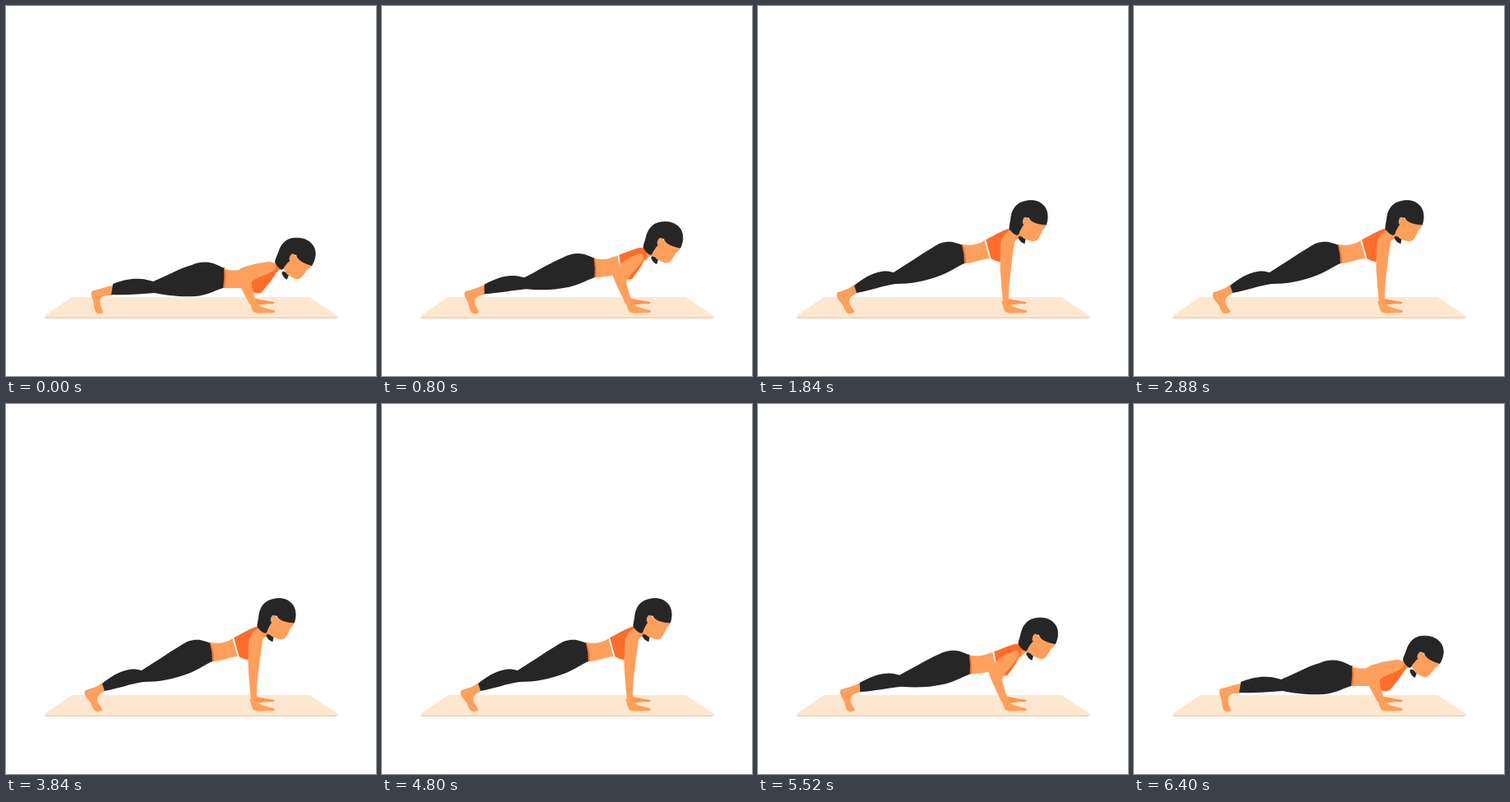
These frames come from a looping animation (450 by 450 pixels, 6.48 s). An HTML page:

```html
<!DOCTYPE html>
<html lang="en">
<head>
<meta charset="utf-8">
<title>Push-up</title>
<style>
  html, body { margin: 0; width: 100%; height: 100%; overflow: hidden; background: #fff; }
  svg { display: block; width: 100%; height: 100%; }
  .skin { fill: #ff9f5c; }
  .shade { fill: #fb9550; }
  .top { fill: #ff6d2b; }
  .dark { fill: #262626; }
  .line { fill: none; stroke-linecap: round; }
</style>
</head>
<body>
<svg viewBox="0 0 450 450">
  <path fill="#efd2ad" d="M48 377H402Q404 380 400 380H50Q46 380 48 377Z"/>
  <path fill="#fde8cf" d="M80 354H369L402 376Q404 378.5 400 378.5H50Q46 378.5 48 376Z"/>
  <path class="shade" d="M300 355C308 357 315 358 326 360C328 362 325 363 320 362C313 363 308 363 304 364Z"/>
  <path id="foot" class="skin"/>
  <path id="torso" class="skin"/>
  <path id="neck" class="shade"/>
  <path id="bra" class="top"/>
  <path id="hem" class="line" stroke="#fff" stroke-width="1.8"/>
  <path id="arm" class="skin"/>
  <path class="skin" d="M296 359L305 360C307 366 313 367 326 370C329 372 325 374 320 373C313 373 304 375 300 371Z"/>
  <path id="waist" class="line" stroke="#f0712f" stroke-width="2.4"/>
  <path id="pants" class="dark"/>
  <g id="head">
    <path class="dark" d="M-8 21C-5 21 -2 22 0 24L-1 30C-4 30 -8 26 -9 23Z"/>
    <path class="skin" d="M-3 -2L25 6C25 9 23 12 20 14C20 17 17 20 16 23C14 27 9 28 7 27L-2 24L-8 18Z"/>
    <path class="dark" stroke="#191919" stroke-width=".7" d="M25 7C27 1 28 -8 23 -15C17 -23 6 -24 -3 -21C-13 -18 -17 -10 -18 0C-19 8 -21 11 -18 14C-15 18 -11 20 -9 19C-7 13 -4 8 -1 5C0 0 2 -2 4 -2C6 3 12 6 25 7Z"/>
    <ellipse class="skin" cx="0" cy="2.5" rx="3" ry="4.8" transform="rotate(12)"/>
  </g>
</svg>
<script>
  const LOOP = 6480, STEP = 80;

  // Each part: evenly spaced poses from lowered to raised.
  const parts = {
    foot: [
      "M130 340C122 341 113 345 106 346C102 348 104 353 106 358C107 363 107 368 109 372C111 375 118 375 118 372C117 368 113 363 115 356C117 352 123 352 129 352Z",
      "M117 339C111 344 104 346 97 348C93 351 98 358 102 362C105 366 105 370 108 373C111 375 118 374 117 371C115 367 110 363 111 358C112 354 116 351 121 349Z"
    ],
    torso: [
      "M263 319C272 322 278 322 284 321L300 316L302 347L290 343C280 343 272 343 264 343Z",
      "M247 290C260 292 268 290 276 285L280 284L285 306L282 307C270 308 262 313 251 313Z"
    ],
    neck: [
      "M318 313L334 312L345 312L343 322C336 318 333 320 330 324L320 324Z",
      "M302 273L316 262L328 270L322 284C317 280 313 284 310 290L302 290Z"
    ],
    bra: [
      "M296 317C304 315 312 313 318 312C323 311 329 314 331 319C328 328 318 340 311 348C307 350 303 349 299 348Z",
      "M276 285C285 280 295 274 304 271C308 270 311 273 311 277C308 290 300 304 295 311C291 311 287 309 283 307Z"
    ],
    hem: ["M296 318L298 346", "M276.500 285.500L282.500 307"],
    arm: [
      "M320 311C312 312 304 313 295 316C285 318 280 321 281 331C285 343 291 352 296 362L305 363C303 355 300 346 298 337C300 331 316 328 327 321C331 317 326 311 320 311Z",
      "M312 300C306 302 299 305 292 311C284 317 279 320 281 328C285 340 291 350 296 362L305 363C302 353 299 345 297 336C298 328 308 320 315 309C318 304 317 299 312 300Z",
      "M306 273C300 277 296 282 295 291C295 302 294 312 295 326C296 340 297 350 298 362L305 363C305 354 305 344 306 332C308 322 309 304 312 288C315 280 311 271 306 273Z"
    ],
    waist: ["M265 319Q267 330 265 342", "M248 291Q252 301 252 312"],
    pants: [
      "M130 338C143 333 153 331 164 332C170 332 174 334 179 335C196 328 211 319 226 315C238 310 249 311 257 315C261 317 264 318 265 319Q266 331 264 343C252 347 243 352 231 353C211 354 196 352 181 349C163 350 147 352 128 351Z",
      "M117 340C127 332 137 325 150 323C156 322 160 323 165 324C181 314 197 303 212 294C221 287 232 285 240 288C244 289 247 290 248 291Q251 302 251 313C241 318 235 322 224 327C204 335 185 338 167 338C152 340 137 346 120 349Z"
    ]
  };

  const byId = id => document.getElementById(id);
  const lerp = (a, b, p) => a + (b - a) * p;
  const ease = (t, from, to) => {
    const u = Math.min(1, Math.max(0, (t - from) / (to - from)));
    return u * u * (3 - 2 * u);
  };

  function blend(poses, p) {
    const x = p * (poses.length - 1);
    const i = Math.min(Math.floor(x), poses.length - 2);
    const next = poses[i + 1].match(/[\d.]+/g);
    let n = 0;
    return poses[i].replace(/[\d.]+/g, v => lerp(+v, +next[n++], x - i).toFixed(2));
  }

  function draw(now) {
    const t = Math.floor((now % LOOP) / STEP) * STEP;
    const p = ease(t, 400, 1280) - ease(t, 5030, 5990);
    for (const id in parts) byId(id).setAttribute("d", blend(parts[id], p));
    byId("head").setAttribute("transform",
      `translate(${lerp(349, 325.5, p)} ${lerp(303.5, 259, p)}) rotate(${lerp(12, 0, p)})`);
  }

  const start = performance.now();
  function tick() {
    draw(performance.now() - start);
    requestAnimationFrame(tick);
  }
  tick();
</script>
</body>
</html>
```
